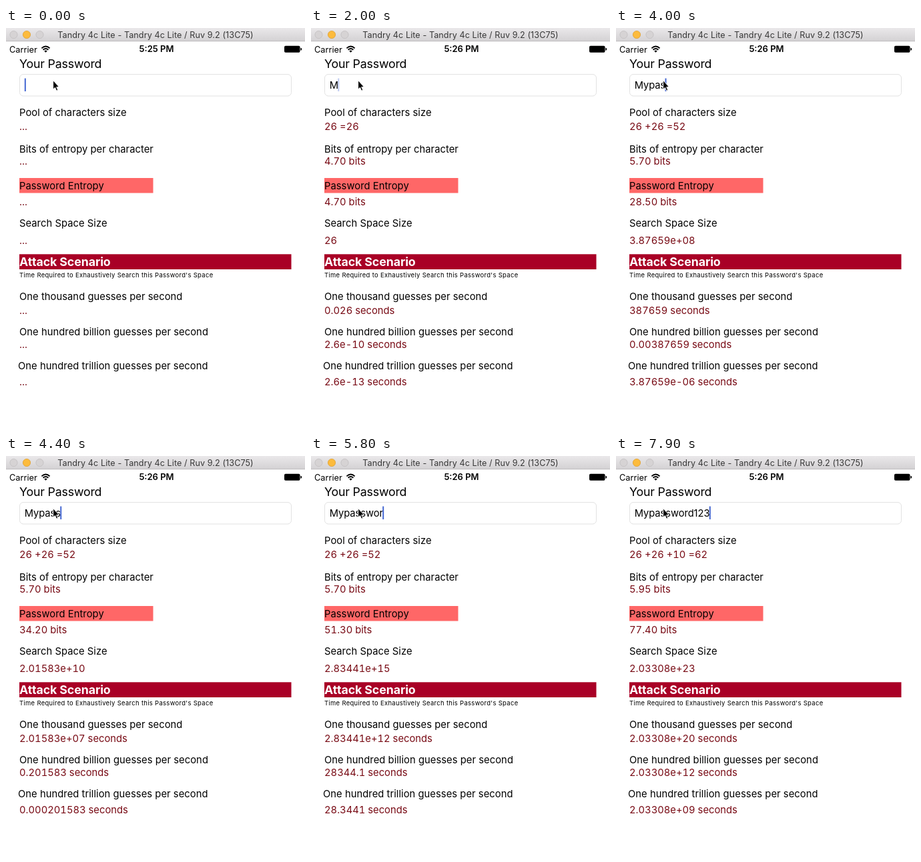
Recreate the animation shown at these times as an HTML page. Size 448 by 600 pixels, loop 8000 ms.

```html
<!DOCTYPE html>
<html lang="en">
<head>
<meta charset="utf-8">
<title>Password entropy</title>
<style>
  html, body { margin: 0; width: 100%; height: 100%; overflow: hidden; background: #fff; }
  svg { display: block; width: 448px; height: 600px; }
  text { font-family: Inter, Roboto, "Liberation Sans", sans-serif; font-size: 14.75px; fill: #000; white-space: pre; }
  .label { letter-spacing: .045px; }
  .value { fill: #780a14; font-variant-numeric: tabular-nums; }
  .typed { letter-spacing: -.08px; }
  .title { font-size: 12.6px; letter-spacing: .08px; fill: #383838; text-anchor: middle; }
  .status { font-size: 12.8px; }
  .clock { font-size: 13px; font-weight: 600; text-anchor: middle; }
  .heading { font-size: 17.8px; letter-spacing: -.2px; }
  .banner { font-size: 17.8px; font-weight: 700; letter-spacing: -.1px; fill: #fff; }
  .note { font-size: 9.45px; letter-spacing: .32px; }
</style>
</head>
<body>
<svg viewBox="0 0 448 600">
  <defs>
    <linearGradient id="bar" x1="0" y1="0" x2="0" y2="1">
      <stop offset="0" stop-color="#eae8ea"/>
      <stop offset="1" stop-color="#d3d1d3"/>
    </linearGradient>
  </defs>
  <rect width="448" height="600" fill="#fff"/>

  <rect width="448" height="20" fill="url(#bar)"/>
  <rect y="19.4" width="448" height=".8" fill="#b8b6b8"/>
  <g stroke-width=".8">
    <circle cx="11.5" cy="10" r="5.6" fill="#d6d3d4" stroke="#c1bebf"/>
    <circle cx="31" cy="10" r="5.6" fill="#fcbb3d" stroke="#dfa032"/>
    <circle cx="50.5" cy="10" r="5.6" fill="#d6d3d4" stroke="#c1bebf"/>
  </g>
  <text class="title" x="224" y="14.5">Tandry 4c Lite - Tandry 4c Lite / Ruv 9.2 (13C75)</text>

  <text class="status" x="5" y="36.5">Carrier</text>
  <g fill="none" stroke="#000" stroke-width="1.9">
    <path d="M53.4 30.4Q59.5 24.8 65.6 30.4"/>
    <path d="M55.6 32.8Q59.5 29.3 63.4 32.8"/>
  </g>
  <path d="M57.3 34.5Q59.5 32.7 61.7 34.5L59.5 36.8Z"/>
  <text class="clock" id="clock" x="225.5" y="36"></text>
  <rect x="417" y="26.8" width="23.5" height="10" rx="1.8"/>
  <path d="M441.3 29.8Q443.3 30 443.3 31.8T441.3 33.8Z"/>

  <rect x="20.5" y="69.5" width="407" height="32.5" rx="5.5" fill="#fff" stroke="#e2e2e2"/>
  <rect x="20" y="225" width="200.5" height="22.5" fill="#ff6767"/>
  <rect x="20" y="339.3" width="407.5" height="22.7" fill="#a90026"/>
  <text class="heading" x="20" y="60.4">Your Password</text>
  <text class="banner" x="20" y="357">Attack Scenario</text>
  <text class="note" x="20" y="374">Time Required to Exhaustively Search this Password's Space</text>
  <g id="rows"></g>

  <text class="typed" id="field" x="27.7" y="91"></text>
  <rect id="caret" y="75.5" width="2" height="19.5" fill="#4467d2"/>
  <path d="M70.6 78.6V92L73.5 89.3L75.6 94.2L77.8 93.2L75.7 88.5H79.6Z" fill="#000" stroke="#fff" stroke-width="1" stroke-linejoin="round"/>
</svg>
<script>
const LOOP = 8000;
const CLOCK_TICK = 900;
const PASSWORD = "Mypassword123";
const KEY_TIMES = [1100, 2200, 2700, 3500, 3800, 4200, 4700, 5100, 5500, 5900, 6200, 6900, 7300];

// label, label x, label baseline, value baseline
const ROWS = [
  ["Pool of characters size", 20, 132, 153],
  ["Bits of entropy per character", 20, 187, 205],
  ["Password Entropy", 20, 241.6, 266],
  ["Search Space Size", 20, 298, 324],
  ["One thousand guesses per second", 20, 407.6, 429],
  ["One hundred billion guesses per second", 20, 461, 480.4],
  ["One hundred trillion guesses per second", 18, 512.2, 536]
];

const byId = id => document.getElementById(id);
const clock = byId("clock"), field = byId("field"), caret = byId("caret");

function addText(x, y, className, content) {
  const node = document.createElementNS("http://www.w3.org/2000/svg", "text");
  node.setAttribute("x", x);
  node.setAttribute("y", y);
  node.setAttribute("class", className);
  node.textContent = content;
  return byId("rows").appendChild(node);
}

const values = ROWS.map(([label, x, labelY, valueY]) => {
  addText(x, labelY, "label", label);
  return addText(20, valueY, "value", "...");
});

// Six significant digits, like printf's %g
function formatG(number) {
  const [mantissa, exponent] = number.toExponential(5).split("e");
  const power = Number(exponent);
  if (power >= -4 && power < 6) return String(Number(number.toPrecision(6)));
  const digits = String(Math.abs(power)).padStart(2, "0");
  return Number(mantissa) + "e" + (power < 0 ? "-" : "+") + digits;
}

function analyse(password) {
  if (!password) return ROWS.map(() => "...");
  const sets = [[/[a-z]/, 26], [/[A-Z]/, 26], [/\d/, 10]]
    .filter(([pattern]) => pattern.test(password))
    .map(([, size]) => size);
  const pool = sets.reduce((sum, size) => sum + size, 0);
  const bits = Math.log2(pool);
  let space = 0;
  for (let n = 1; n <= password.length; n++) space += pool ** n;
  return [
    sets.join(" +") + " =" + pool,
    bits.toFixed(2) + " bits",
    (bits * password.length).toFixed(2) + " bits",
    formatG(space),
    ...[1e3, 1e11, 1e14].map(rate => formatG(space / rate) + " seconds")
  ];
}

function caretOpacity(age) {
  const phase = age % 1000;
  if (phase < 620) return 1;
  if (phase < 770) return (770 - phase) / 150;
  return Math.max(0, (phase - 850) / 150);
}

function render(time) {
  const count = KEY_TIMES.filter(key => key <= time).length;
  const typed = PASSWORD.slice(0, count);
  clock.textContent = time < CLOCK_TICK ? "5:25 PM" : "5:26 PM";
  field.textContent = typed;
  analyse(typed).forEach((content, i) => { values[i].textContent = content; });
  caret.setAttribute("x", count ? 27 + field.getComputedTextLength() : 27.8);
  caret.setAttribute("opacity", caretOpacity(time - (count ? KEY_TIMES[count - 1] : 0)));
}

function tick() {
  render(performance.now() % LOOP);
  requestAnimationFrame(tick);
}
tick();
</script>
</body>
</html>
```
